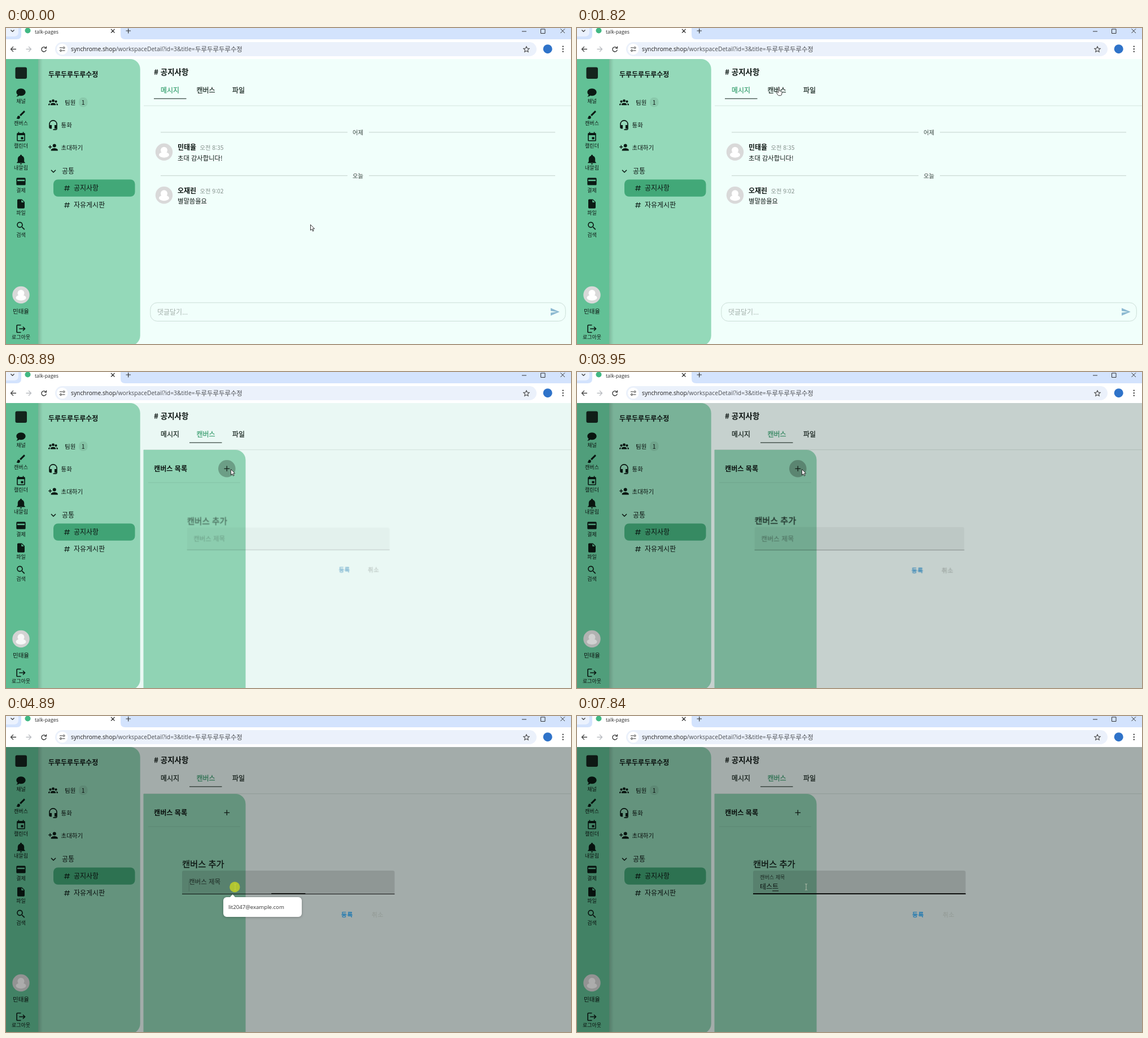
Recreate the animation shown at these times as an HTML page. Size 1001 by 560 pixels, loop 8000 ms.

```html
<!DOCTYPE html>
<html lang="ko">
<head>
<meta charset="utf-8">
<title>talk-pages</title>
<style>
html, body { margin: 0; width: 100%; height: 100%; overflow: hidden; background: #f1fffb; }
svg { display: block; width: 1001px; height: 560px; }
text { font-family: "Noto Sans CJK KR", "Noto Sans KR", "Noto Sans CJK", sans-serif; white-space: pre; }
.ui { font-family: "Open Sans", "Noto Sans", sans-serif; }
.medium { stroke: currentColor; stroke-width: .3px; }
</style>
</head>
<body>
<svg id="stage" viewBox="0 0 1001 560" xmlns="http://www.w3.org/2000/svg"></svg>
<script>
const USER = '민태율', FRIEND = '오재린', SPACE = '두루두루두루수정';

const ICONS = {
  chat: 'M12 3c5.5 0 10 3.6 10 8s-4.5 8-10 8c-1.2 0-2.5-.2-3.6-.5C5 21 2 21 2 21c2.3-2.3 2.7-3.9 2.8-4.5C3 15 2 13 2 11c0-4.4 4.5-8 10-8z',
  brush: 'M20.7 4.6L19.4 3.3c-.4-.4-1-.4-1.4 0L9 12.25 11.75 15l8.95-9c.4-.4.4-1 0-1.4M7 14a3 3 0 0 0-3 3c0 1.3-1.2 2-2 2 .9 1.2 2.5 2 4 2a4 4 0 0 0 4-4 3 3 0 0 0-3-3z',
  calendar: 'M19 19H5V8h14M16 1v2H8V1H6v2H5a2 2 0 0 0-2 2v14a2 2 0 0 0 2 2h14a2 2 0 0 0 2-2V5a2 2 0 0 0-2-2h-1V1M17 12h-5v5h5z',
  bell: 'M21 19v1H3v-1l2-2v-6c0-3.1 2-5.8 5-6.7V4a2 2 0 0 1 4 0v.3c3 .9 5 3.6 5 6.7v6zM14 21a2 2 0 0 1-4 0',
  card: 'M20 4H4a2 2 0 0 0-2 2v12a2 2 0 0 0 2 2h16a2 2 0 0 0 2-2V6a2 2 0 0 0-2-2m0 7H4V8h16z',
  file: 'M13 9V3.5L18.5 9M6 2a2 2 0 0 0-2 2v16a2 2 0 0 0 2 2h12a2 2 0 0 0 2-2V8l-6-6z',
  search: 'M9.5 3a6.5 6.5 0 0 1 4.94 10.73l.27.27h.8l5 5-1.5 1.5-5-5v-.8l-.27-.27A6.5 6.5 0 1 1 9.5 3m0 2a4.5 4.5 0 1 0 0 9 4.5 4.5 0 0 0 0-9z',
  logout: 'M17 7l-1.4 1.4L18.2 11H8v2h10.2l-2.6 2.6L17 17l5-5M4 5h8V3H4a2 2 0 0 0-2 2v14a2 2 0 0 0 2 2h8v-2H4z',
  group: 'M12 5.5a3.5 3.5 0 0 1 0 7a3.5 3.5 0 0 1 0-7M5 8a3 3 0 0 1 0 6a3 3 0 0 1 0-6M19 8a3 3 0 0 1 0 6a3 3 0 0 1 0-6M5.5 20v-1.7c0-2 3-3.8 6.5-3.8s6.5 1.8 6.5 3.8V20zM0 20v-1.5c0-1.4 1.9-2.6 4.4-2.9-.6.7-.9 1.6-.9 2.6V20zM24 20v-1.5c0-1.4-1.9-2.6-4.4-2.9.6.7.9 1.6.9 2.6V20z',
  headset: 'M12 1a9 9 0 0 0-9 9v7a3 3 0 0 0 3 3h3v-8H5v-2a7 7 0 0 1 14 0v2h-4v8h4v1h-7v2h6a3 3 0 0 0 3-3V10a9 9 0 0 0-9-9z',
  invite: 'M15 14c-2.7 0-8 1.3-8 4v2h16v-2c0-2.7-5.3-4-8-4M6 10V7H4v3H1v2h3v3h2v-3h3v-2M15 12a4 4 0 0 0 0-8a4 4 0 0 0 0 8z',
  pound: 'M5.4 21l.7-4h-4l.35-2h4l1.05-6h-4l.4-2h4l.7-4h2l-.7 4h6l.7-4h2l-.7 4h4l-.35 2h-4l-1.05 6h4l-.35 2h-4l-.7 4h-2l.7-4h-6l-.7 4zM9.5 9l-1 6h6l1-6z',
  send: 'M2 21l21-9L2 3v7l15 2-15 2z'
};

const icon = (name, x, y, size = 19.5, fill = '#0b1a14') =>
  `<path d="${ICONS[name]}" fill="${fill}" fill-rule="evenodd" transform="translate(${x - size / 2} ${y - size / 2}) scale(${size / 24})"/>`;
const text = (x, y, size, str, { weight = 400, color = '#0d1613', more = '' } = {}) =>
  `<text x="${x}" y="${y}" font-size="${size}" font-weight="${weight}" color="${color}" fill="currentColor" ${more}>${str}</text>`;
const rect = (x, y, w, h, fill, r = 0, more = '') =>
  `<rect x="${x}" y="${y}" width="${w}" height="${h}" rx="${r}" fill="${fill}" ${more}/>`;
const line = (d, color = '#333', w = 1.2, more = '') =>
  `<path d="${d}" fill="none" stroke="${color}" stroke-width="${w}" ${more}/>`;
const disc = (x, y, r, fill, more = '') => `<circle cx="${x}" cy="${y}" r="${r}" fill="${fill}" ${more}/>`;
const group = (id, body) => `<g id="${id}">${body}</g>`;
const avatar = (x, y) => `<g transform="translate(${x} ${y})">${disc(0, 0, 15.2, '#d9d9d9')}${disc(0, -3, 6, '#fff')}
  <ellipse cy="5" rx="9" ry="5" fill="#fff"/></g>`;

const mid = 'text-anchor="middle"', ui = 'class="ui"', medium = 'class="medium"';

const browser = () => rect(0, 0, 1001, 20, '#d3e3fd') + rect(-8, -10, 30, 25, '#ebf2fe', 7) +
  line('M8.5 3.5l3 3 3-3') +
  '<path d="M19 20q8 0 8-8V0H203v12q0 8 8 8z" fill="#fff"/>' + rect(0, 20, 1001, 35, '#fff') +
  disc(38.5, 4.5, 5, '#41b883') + text(51, 10, 8.8, 'talk-pages', { color: '#2a2a2a', more: ui }) +
  line('M186 2l6.5 6.5M192.5 2L186 8.5M212.5 5h8.5M216.7 1v8.5') +
  line('M914 6h8M947.5 2h7.5v7.5h-7.5zM982.5 1.5l7.5 7.5M990 1.5L982.5 9', '#333', 1) +
  line('M18 37.5H9M13 33l-4.5 4.5L13 42', '#444', 1.3) +
  line('M35.5 37.5h9M40 33l4.5 4.5L40 42', '#b8bbc0', 1.3) +
  line('M70.7 35.5a4.2 4.2 0 1 0 .6 3M71.5 32.5v3.4h-3.4', '#333', 1.3) +
  rect(87, 25, 853, 25, '#ebf1fb', 12.5) + disc(99.7, 37.5, 9.8, '#fff') +
  line('M95 35h5M99.500 40h5') + disc(102.5, 35, 1.5, 'none', 'stroke="#333"') + disc(97, 40, 1.5, 'none', 'stroke="#333"') +
  text(115, 41.2, 10.3, 'synchrome.shop<tspan fill="#4a4d52">/workspaceDetail?id=3&amp;title=</tspan>', { color: '#1f1f1f', more: ui }) +
  text(335, 41.5, 11.4, SPACE, { color: '#4a4d52' }) +
  line('M922 32.8l1.5 3.3 3.6.4-2.7 2.4.8 3.6-3.2-1.9-3.2 1.9.8-3.6-2.7-2.4 3.6-.4z', '#444', 1.1) +
  disc(959.7, 37.2, 8, '#2f73c9') + [32.7, 37.2, 41.7].map(y => disc(986.8, y, 1.2, '#444')).join('');

const navItems = [['chat', '채널'], ['brush', '캔버스'], ['calendar', '캘린더'], ['bell', '내알림'], ['card', '결제'], ['file', '파일'], ['search', '검색']];

const sidebar = () => rect(40, 55, 197.7, 508, '#94d9b9', 18) + rect(57, 55, 8, 505, 'url(#shade)') +
  rect(0, 55, 57, 505, '#62c196') + rect(16.5, 69.5, 20.5, 20.5, '#14241d', 3) +
  navItems.map(([name, label], i) => icon(name, 26.5, 114.5 + i * 39.4) + text(26.5, 132.5 + i * 39.65, 9, label, { more: mid })).join('') +
  avatar(26.5, 473) + text(26.5, 506, 10.5, USER, { more: mid }) +
  icon('logout', 26.5, 533) + text(26.5, 550.7, 9, '로그아웃', { more: mid }) +
  text(75, 87.4, 12, SPACE, { weight: 700 }) +
  icon('group', 83.5, 131, 17) + text(104, 136, 10.5, '팀원') + rect(129, 123, 15.5, 17, '#000', 7, 'opacity=".07"') + text(136.7, 135.5, 10.5, '1', { more: mid }) +
  icon('headset', 83.5, 172) + text(97.5, 176.4, 10.5, '통화') +
  icon('invite', 83.5, 211.5, 18) + text(97.5, 216.2, 10.5, '초대하기') +
  line('M80 251.8l4 4 4-4', '#0b1a14', 1.5) + text(99, 258, 12, '공통') +
  rect(84, 268.5, 144.5, 30.3, '#42a878', 8) +
  ['공지사항', '자유게시판'].map((s, i) => icon('pound', 108, 283.7 + i * 30, 12.5) + text(120, 288.4 + i * 30, 12, s)).join('');

const header = () => text(262, 83, 13.5, '# 공지사항', { weight: 700 }) +
  ['메시지', '캔버스', '파일'].map((s, i) => text(274 + i * 63.5, 114.8, 12, s, { color: '#25332d', more: `${medium} id="tab${i}"` })).join('') +
  rect(262, 124.6, 57.5, 1.3, '#43534c', 0, 'id="slider"') + rect(244, 137.3, 757, 1, '#d5e5df');

const divider = (y, label) => line(`M274 ${y}h331M643 ${y}h330`, '#c3d1cc', 1) + text(623.5, y + 4.6, 10.4, label, { more: mid, color: '#3a4641' });
const message = (y, name, time, body) => avatar(280, y) + text(304, y - 3.5, 12, name, { weight: 700 }) +
  text(343.5, y - 3.5, 10.3, time, { color: '#84918c' }) + text(304, y + 15.2, 11.3, body);

const chat = () => divider(184.8, '어제') + message(219.7, USER, '오전 8:35', '초대 감사합니다!') +
  divider(261.7, '오늘') + message(296.2, FRIEND, '오전 9:02', '별말씀을요') +
  rect(255.8, 486.8, 735.5, 32.7, 'none', 12, 'stroke="#cbded7"') +
  text(268, 508, 12, '댓글달기...', { color: '#a5b1ac' }) + icon('send', 972.5, 503, 18, '#8cb9d1');

const canvasList = () => '<path d="M243.500 138H406.500a18 18 0 0 1 18 18V560H243.500z" fill="#94d9b9"/>' +
  text(262, 176.2, 12.1, '캔버스 목록', { weight: 700 }) + rect(252, 195.5, 163, 1, '#000', 0, 'opacity=".08"') +
  disc(391.3, 171.3, 15.3, '#000', 'id="halo"') + line('M386.5 171.3h9.6M391.3 166.5v9.6', '#16241d', 1.3);

const dialog = () => text(312, 268, 15.3, '캔버스 추가', { more: medium }) +
  '<path id="field" d="M312 316V277a3 3 0 0 1 3-3H685.5a3 3 0 0 1 3 3V316z"/>' +
  rect(312, 315, 376.5, 1, '#000', 0, 'id="rule"') + rect(-188.25, 314.2, 376.5, 1.8, '#000', 0, 'id="focus"') +
  text(0, 0, 12, '캔버스 제목', { more: 'id="label"', color: '#000' }) +
  text(324, 306.5, 12, '', { more: 'id="value"' }) + rect(324, 309.4, 11, 1, '#111', 0, 'id="compose"') + rect(324, 292.5, 1, 18, '#111', 0, 'id="caret"') +
  text(594, 356.3, 10.6, '등록', { color: '#1d78b2', more: `${medium} letter-spacing=".8"` }) +
  text(648, 356.3, 10.6, '취소', { color: '#969e9a', more: `${medium} letter-spacing=".8"` });

const popup = () => '<path d="M391 321H397l4.5-5 4.5 5H518a6 6 0 0 1 6 6V350a6 6 0 0 1-6 6H391a6 6 0 0 1-6-6V327a6 6 0 0 1 6-6z" fill="#fff" filter="drop-shadow(0 1px 2px rgba(0,0,0,.25))"/>' +
  text(394, 341.8, 9.6, 'lit2047@example.com', { color: '#333', more: ui });

const cursors = () =>
  group('arrow', '<path d="M.5.5V10.5l2.3-2.1 1.700 3.700 1.600-.7-1.700-3.600h3.200z" fill="#fff" stroke="#222" stroke-width=".9"/>') +
  group('hand', '<path d="M-1-1.5c0-1.4 2-1.4 2 0V4l3.5.8q1.5.4 1.3 2L5 10.5q-.5 1.7-2 1.7H0q-1 0-1.6-1L-4.3 7c-.8-1.3.6-2.2 1.5-1.2L-1 7.3z" fill="#fff" stroke="#222" stroke-width=".9"/>') +
  group('beam', line('M-2-5.5q2 0 2 1.2 0-1.2 2-1.2M0-4.5v9M-2 5.5q2 0 2-1.2 0 1.2 2 1.2', '#b9c5b2', .9));

document.getElementById('stage').innerHTML =
  '<defs><linearGradient id="shade"><stop stop-color="#000" stop-opacity=".15"/><stop offset="1" stop-color="#000" stop-opacity="0"/></linearGradient></defs>' +
  rect(0, 0, 1001, 560, '#f1fffb') + sidebar() + header() + group('chat', chat()) + group('list', canvasList()) +
  rect(0, 55, 1001, 505, '#000', 0, 'id="scrim"') + group('dialog', dialog()) + browser() +
  group('popup', popup()) + cursors() + disc(0, 0, 9.2, '#c8d622', 'id="click" opacity=".8"');

const $ = id => document.getElementById(id);
const set = (id, attrs) => { for (const k in attrs) $(id).setAttribute(k, attrs[k]); };
const show = (id, on) => set(id, { visibility: on ? 'visible' : 'hidden' });
const ramp = (t, from, length) => Math.min(1, Math.max(0, (t - from) / length));
const smooth = x => x * x * (3 - 2 * x);
const mix = (a, b, p) => a + (b - a) * p;

// time, x, y of the pointer tip
const path = [[0, 539, 348], [340, 539, 348], [410, 536, 349], [550, 536, 349], [1350, 445, 269], [1820, 357.5, 107.5],
  [2700, 357.5, 107.5], [3550, 398, 172], [4080, 398, 172], [4420, 366, 231], [4690, 406, 303], [8000, 406, 303]];
// time, typed text, whether the last letter is still being composed
const typing = [[4890, '', 0], [5750, 'x', 0], [6190, '', 0], [6380, 'ㅌ', 1], [6580, '테', 1], [6780, '테ㅅ', 1], [7050, '테스', 1], [7320, '테스트', 1]];
const clicks = [[2150, 2220], [3620, 3750], [4890, 5020]];

function pointer(t) {
  const i = Math.max(1, path.findIndex(p => p[0] > t));
  const [t0, x0, y0] = path[i - 1], [t1, x1, y1] = path[i];
  const p = smooth((t - t0) / (t1 - t0));
  return [mix(x0, x1, p), mix(y0, y1, p)];
}

function drawInput(t) {
  const p = t < 4890 ? 0 : smooth(ramp(t, 4853, 150));
  const hover = ramp(t, 4480, 150);
  set('focus', { transform: `translate(500.25 0) scale(${p} 1)` });
  set('label', { transform: `translate(324 ${mix(299.6, 289.4, p)}) scale(${mix(1, .76, p)})`, 'fill-opacity': mix(.45, .68, hover) });
  set('field', { 'fill-opacity': mix(.05, .12, hover) });
  set('rule', { opacity: mix(.38, .85, hover) });

  const [since, str, composing] = typing.filter(s => s[0] <= t).pop() || [0, '', 0];
  const end = 324 + (str === 'x' ? 6.5 : str.length * 11.04);
  if ($('value').textContent !== str) $('value').textContent = str;
  show('compose', composing);
  set('compose', { x: end - 11 });
  show('caret', since && (t - since) % 1050 < 520);
  set('caret', { x: end - .2, opacity: p });
}

function draw(t) {
  const second = t >= 2200;
  set('tab0', { color: second ? '#25332d' : '#43a678' });
  set('tab1', { color: second ? '#43a678' : '#25332d' });
  set('slider', { x: second ? 325 : 262 });
  show('chat', !second);
  show('list', t >= 2360);

  const [x, y] = pointer(t);
  const overAdd = t < 3840 && Math.hypot(x - 391.3, y - 171.3) < 15.3;
  const overTab = t < 3000 && y < 125 && x < 382;
  const kind = t >= 4600 ? 'beam' : overAdd || overTab ? 'hand' : 'arrow';
  for (const id of ['arrow', 'hand', 'beam']) show(id, id === kind);
  set(kind, { transform: `translate(${x} ${y})` });

  const press = ramp(t, 3640, 150) * (1 - ramp(t, 3980, 200));
  set('halo', { opacity: Math.max(overAdd ? .06 : 0, .25 * press) });

  const open = 1 - (1 - ramp(t, 3840, 225)) ** 3, scale = mix(.9, 1, open);
  set('scrim', { opacity: .325 * smooth(ramp(t, 3862, 165)) });
  set('dialog', { opacity: open, transform: `translate(500 308) scale(${scale}) translate(-500 -308)` });
  show('dialog', t >= 3840);
  if (t >= 3840) drawInput(t);
  else for (const id of ['caret', 'compose']) show(id, false);

  show('popup', t >= 4890 && t < 5900);
  set('popup', { opacity: 1 - ramp(t, 5750, 150) });
  show('click', clicks.some(([a, b]) => t >= a && t < b));
  set('click', { cx: x - .7, cy: y });
}

const start = performance.now();
function tick() {
  draw((performance.now() - start) % 8000);
  requestAnimationFrame(tick);
}
tick();
</script>
</body>
</html>
```
